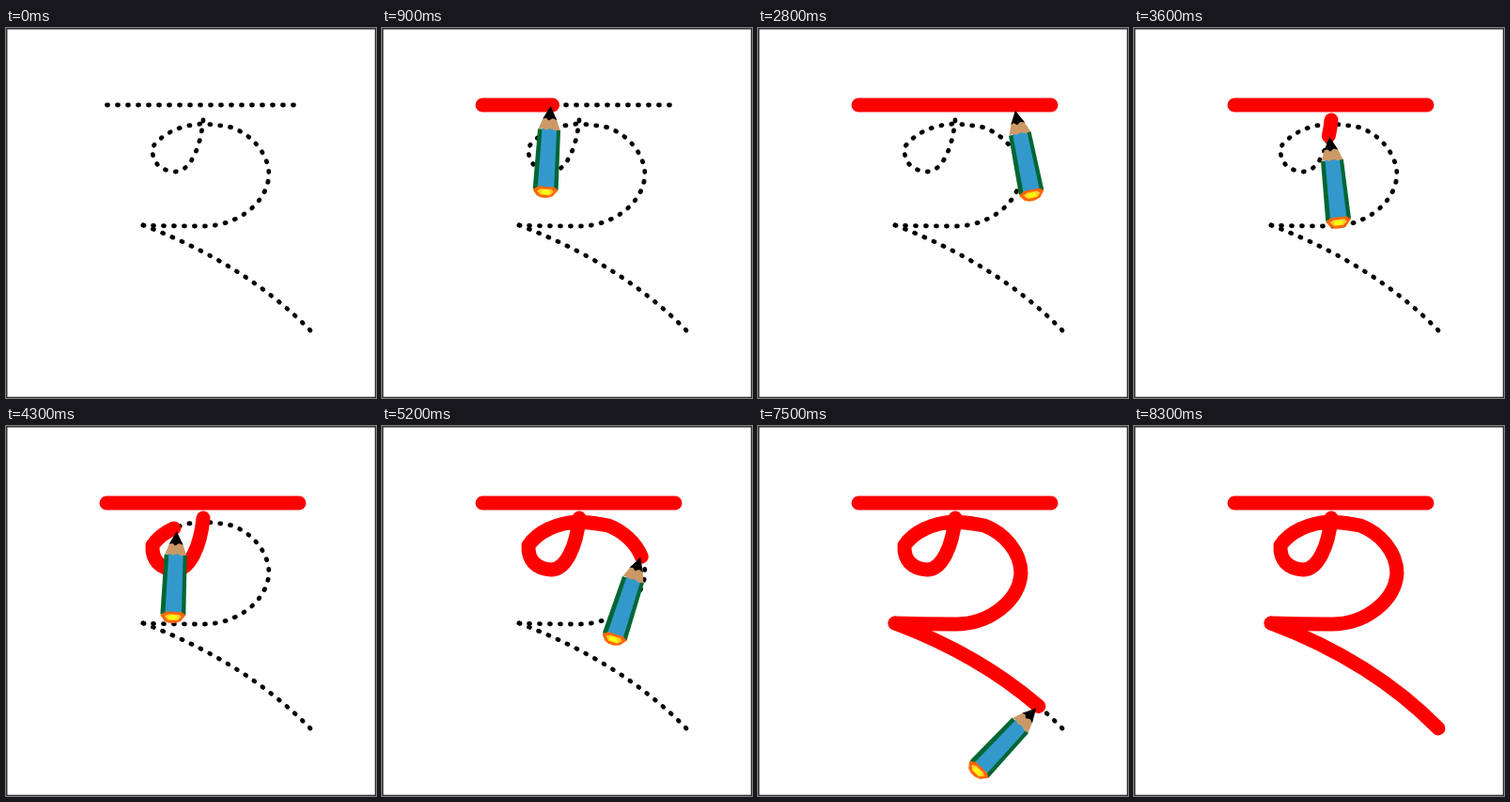
Recreate the animation shown at these times as an HTML page. Size 394 px wide and 394 px high, loop 8400 ms.

```html
<!DOCTYPE html>
<html lang="en">
<head>
<meta charset="utf-8">
<title>Letter tracing</title>
<style>
  html, body { margin: 0; width: 100%; height: 100%; overflow: hidden; background: #fff; }
  svg { display: block; width: 100%; height: 100%; }
  .dots, .ink { fill: none; stroke-linecap: round; stroke-linejoin: round; }
  .dots { stroke: #000; stroke-width: 4.8; }
  .ink { stroke: #f00; stroke-width: 15; }
</style>
</head>
<body>
<svg viewBox="0 0 394 394">
  <g id="guides"></g>
  <g id="inks"></g>
  <g id="pencil">
    <path fill="#063" d="M-12 25L-13.5 89H13.5L12 25Z"/>
    <path fill="#39c" d="M-7.5 24L-8.5 88H9L8 24Z"/>
    <path fill="#c96" d="M-6.5 12L-11.5 25L-7 24L-3 26L1 24L6 26L11.5 25L6.5 12Z"/>
    <path d="M0 0L-7.5 14L-4 13L-1 15.5L3 13L7.5 14.5Z"/>
    <path fill="#f60" d="M-13.5 90L-8 86H9L13.5 89L8 96L2 98H-4L-9 96Z"/>
    <path fill="#fc3" d="M-9 91L-5 88.500H6L9 91L5 95H-5Z"/>
    <ellipse fill="#ff0" cy="92" rx="5" ry="2.300"/>
  </g>
  <rect x=".75" y=".75" width="392.75" height="392.75" fill="none" stroke="#333" stroke-width="1.5"/>
</svg>
<script>
const LOOP = 8400, STEP = 100, PENCIL_OUT = 8300;

// Each stroke: its path, and keys of [time, drawn fraction].
const strokes = [
  { d: "M107 82H312", guide: "M107.5 82H306.5", keys: [[100, 0], [2300, 1]] },
  { d: "M210 98C207 128 196 153 180 153C164 152 155 143 156 127C166 113 185 103 210 102" +
       "C222 103 231 104 241 106C262 114 280 134 280 157C278 186 247 211 210 211Q178 211 146 210",
    keys: [[3500, 0], [4300, .319], [4500, .394], [5200, .582], [5400, .634], [6000, 1]] },
  { d: "M146 210C215 236 276 273 324 322",
    keys: [[6000, 0], [6700, .43], [7200, .74], [8000, 1]] }
];

// Pencil keys: time, tilt in degrees, tip offset from the ink's end.
const pose = [
  [100, 8.6, -2, 1], [900, 3.5, -2, 1], [1800, -4, -2, 1], [2300, -8, -2, 1],
  [2400, -11.2, -2, 1], [2800, -11.2, -1, 0], [3600, -6, 1, 1], [4300, 2.5, 3, 3],
  [4500, 6, 2, 2], [5200, 18, -1, 1], [5400, 17, -1, 1], [6000, -2, 0, 1],
  [6300, 6, -2, 2], [6700, 12.9, -4, 4], [7200, 35, -4, 3], [8200, 62, 1, 0]
];

const $ = id => document.getElementById(id);
const lerp = (a, b, k) => a + (b - a) * k;

function sample(keys, t) {
  if (t <= keys[0][0]) return keys[0].slice(1);
  const i = keys.findIndex(key => key[0] > t);
  if (i < 0) return keys[keys.length - 1].slice(1);
  const a = keys[i - 1], b = keys[i], k = (t - a[0]) / (b[0] - a[0]);
  return a.slice(1).map((v, j) => lerp(v, b[j + 1], k));
}

function addPath(parent, className, d) {
  const path = document.createElementNS("http://www.w3.org/2000/svg", "path");
  path.setAttribute("class", className);
  path.setAttribute("d", d);
  return $(parent).appendChild(path);
}

for (const s of strokes) {
  const guide = addPath("guides", "dots", s.guide || s.d);
  const length = guide.getTotalLength();
  const pitch = (length - 1) / Math.round(length / 11);
  guide.style.strokeDasharray = `1 ${pitch - 1}`;
  s.ink = addPath("inks", "ink", s.d);
  s.length = s.ink.getTotalLength();
  s.start = s.keys[0][0];
}

function pointOn(s, t) {
  return s.ink.getPointAtLength(s.length * sample(s.keys, t)[0]);
}

function inkEnd(t) {
  if (t > 2400 && t < 3500) {
    const a = pointOn(strokes[0], t), b = pointOn(strokes[1], t), k = (t - 2400) / 1100;
    return { x: lerp(a.x, b.x, k), y: lerp(a.y, b.y, k) };
  }
  return pointOn(strokes.filter(s => t >= s.start).pop() || strokes[0], t);
}

function draw(t) {
  for (const s of strokes) {
    s.ink.style.display = t >= s.start ? "" : "none";
    s.ink.style.strokeDasharray = `${s.length * sample(s.keys, t)[0] + .01} 2000`;
  }
  const end = inkEnd(t), [tilt, dx, dy] = sample(pose, t);
  $("pencil").style.display = t >= 100 && t < PENCIL_OUT ? "" : "none";
  $("pencil").setAttribute("transform", `translate(${end.x + dx} ${end.y + dy}) rotate(${tilt})`);
}

function tick() {
  draw(Math.floor(performance.now() % LOOP / STEP) * STEP);
  requestAnimationFrame(tick);
}
tick();
</script>
</body>
</html>
```
